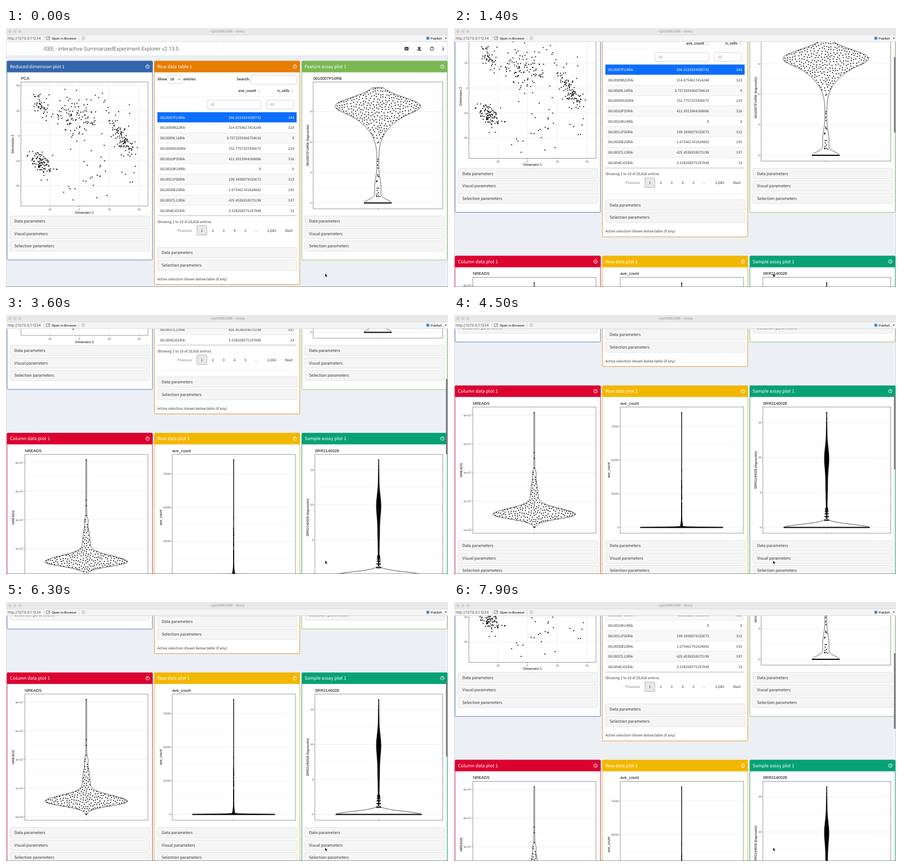
An HTML page for the animation above (8 s loop, 800 px wide and 470 px high).

```html
<!DOCTYPE html>
<html lang="en">
<head>
<meta charset="utf-8">
<title>Shiny app scrolling</title>
<style>
html, body { margin: 0; width: 100%; height: 100%; overflow: hidden; background: #ecf0f5; }
svg { display: block; width: 800px; height: 470px; }
text { white-space: pre; text-rendering: geometricPrecision; }
.ui { font-family: "Noto Sans CJK JP", "Noto Sans CJK SC", "Noto Sans", sans-serif; }
.plot { font-family: "Liberation Sans", Arial, sans-serif; }
.bar { font-family: Inter, "Liberation Sans", sans-serif; }
.logo { font-family: Roboto, "Liberation Sans", sans-serif; font-weight: 300; }
</style>
</head>
<body>
<svg id="stage" viewBox="0 0 800 470"></svg>
<script>
let seed = 11;
const rnd = () => (seed = (seed * 16807) % 2147483647) / 2147483647;
const gauss = () => Math.sqrt(-2 * Math.log(rnd())) * Math.cos(2 * Math.PI * rnd());

const END = 'text-anchor="end"', MID = 'text-anchor="middle"', BOLD = 'font-weight="600"';
const SMALL = 6.4;
const text = (x, y, s, size, cls = 'ui', fill = '#333', extra = '') =>
  `<text x="${x}" y="${y}" dy=".36em" font-size="${size}" class="${cls}" fill="${fill}" ${extra}>${s}</text>`;
const label = (x, y, s, extra = '', fill = '#333') => text(x, y, s, SMALL, 'ui', fill, extra);
const rect = (x, y, w, h, fill, stroke = 'none', extra = '') =>
  `<rect x="${x}" y="${y}" width="${w}" height="${h}" fill="${fill}" stroke="${stroke}" ${extra}/>`;
const path = (d, stroke, width = 1, fill = 'none', extra = '') =>
  `<path d="${d}" stroke="${stroke}" stroke-width="${width}" fill="${fill}" ${extra}/>`;
const dots = (pts, size = 2) =>
  path(pts.map(p => `M${p[0].toFixed(1)} ${p[1].toFixed(1)}h.01`).join(''), '#000', size, 'none', 'stroke-linecap="round"');
const range = (n, f) => Array.from({ length: n }, (_, i) => f(i));

const help = (x, y, color, r = 3.2) =>
  `<circle cx="${x}" cy="${y}" r="${r}" fill="none" stroke="${color}" stroke-width=".9"/>` +
  text(x, y, '?', 5, 'ui', color, MID + ' font-weight="700"');

function panel(x, y, h, color, title) {
  return rect(x, y, 263, h, '#fff', color, 'rx="1.5" stroke-width=".8"') +
    rect(x - .4, y - .3, 263.8, 20.7, color, 'none', 'rx="1.5"') +
    text(x + 5, y + 10, title, 8.2, 'ui', '#fff', 'font-weight="500"') + help(x + 254.3, y + 10, '#fff');
}

const PARAMS = ['Data parameters', 'Visual parameters', 'Selection parameters'];
const foldouts = (x, y, names = PARAMS) => names.map((s, i) =>
  rect(x + 5.5, y - 9.5 + i * 22.5, 252.5, 19, '#f5f5f5', '#ddd', 'rx="2" stroke-width=".8"') +
  text(x + 13, y + i * 22.5, s, 7.3)).join('');

// Plot frame with grid; ticks are evenly spaced from y0 by step.
function frame(x, y, w, h, title, yTitle, ticks, y0, step, titleX, columns) {
  let s = text(x, y - 7, title, 7.3, 'plot', '#000');
  ticks.forEach((tick, i) => {
    const ty = y0 + i * step;
    s += path(`M${x} ${ty}h${w}`, '#ebebeb', .8);
    if (i) s += path(`M${x} ${ty - step / 2}h${w}`, '#f3f3f3', .5);
    s += path(`M${x - 1.8} ${ty}h1.8`, '#555', .6) + text(x - 2.6, ty, tick, 5, 'plot', '#4d4d4d', END);
  });
  for (const cx of columns) s += path(`M${cx} ${y}v${h}`, '#ebebeb', .8) + path(`M${cx} ${y + h}v1.8`, '#555', .6);
  const cy = y + h / 2;
  return s + rect(x, y, w, h, 'none', '#7f7f7f', 'stroke-width=".8"') +
    text(titleX, cy, yTitle, 6.1, 'plot', '#000', `${MID} transform="rotate(-90 ${titleX} ${cy})"`);
}

// Half width of a violin at y: a thin stem plus bumps [centre, height, spread above, spread below].
const profile = (stem, ...bumps) => y => bumps.reduce((w, [c, h, up, down]) =>
  w + h * Math.exp(-(((y - c) / (y < c ? up : down)) ** 2) / 2), stem);

function violin(cx, top, bottom, width, fill = '#fff') {
  const ys = range(2 * (bottom - top) + 1, i => top + i / 2);
  const side = k => ys.map(y => `${(cx + k * width(y)).toFixed(2)} ${y}`);
  return path('M' + [...side(1), ...side(-1).reverse()].join('L') + 'Z', '#222', .8, fill);
}
function swarm(cx, top, bottom, width, max, gap) {
  const pts = [];
  for (let i = 0; i < 8000; i++) {
    const x = cx + (rnd() * 2 - 1) * max, y = top + rnd() * (bottom - top);
    if (Math.abs(x - cx) < width(y) - 1 && pts.every(p => Math.hypot(p[0] - x, p[1] - y) > gap)) pts.push([x, y]);
  }
  return dots(pts);
}
const baseline = (cx, y, w) => path(`M${cx - w} ${y}h${2 * w}`, '#000', 2);

function pcaPlot() {
  // count, centre, spread, slope
  const clusters = [[50, 64, 143, 9, 10, .4], [100, 63, 244, 11, 10, .5], [75, 128, 163, 20, 16, .1],
    [55, 145, 168, 38, 32, 0], [100, 213, 203, 13, 12, 1.1], [26, 142, 275, 44, 22, 0]];
  const pts = clusters.flatMap(([n, cx, cy, sx, sy, slope]) => range(n, () => {
    const dx = gauss() * sx;
    return [cx + dx, cy + dx * slope + gauss() * sy];
  }));
  const xs = range(4, i => 79 + 54 * i);
  return frame(27, 98, 230, 225, 'PCA', 'Dimension 2', ['50', '25', '0', '-25', '-50'], 104.5, 45.4, 12, xs) +
    xs.map((x, i) => text(x, 329, i * 25 - 25, 5, 'plot', '#4d4d4d', MID)).join('') +
    text(142, 334.5, 'Dimension 1', 6.1, 'plot', '#000', MID) +
    dots(pts.filter(p => p[0] > 35 && p[0] < 248 && p[1] > 106 && p[1] < 314));
}

function featurePlot() {
  const cx = 673, width = profile(1.5, [142, 28, 16, 11], [142, 48, 16, 29], [290, 4.3, 16, 20], [317.5, 21, 6, 1]);
  const stem = range(22, () => {
    const y = 308 - 102 * rnd() ** 1.7;
    return [cx + (rnd() - .5) * width(y), y];
  });
  return frame(556, 98, 234.5, 230, '0610007P14Rik', '0610007P14Rik (logcounts)', ['9', '6', '3', '0'], 151.5, 55.3, 546, [cx]) +
    violin(cx, 108.5, 317.5, width) + swarm(cx, 109, 200, width, 78, 3.9) + dots(stem) + baseline(cx, 317.5, 25);
}

function readsPlot() {
  const cx = 145.3, width = profile(.7, [734, 74, 11, 7.8], [698, 6, 22, 12], [659, 1.5, 4, 4]);
  return frame(34, 539, 223, 229, 'NREADS', 'NREADS', ['8e+07', '6e+07', '4e+07', '2e+07', '0e+00'], 553.7, 52, 13, [cx]) +
    violin(cx, 549, 758, width) + swarm(cx, 650, 758, width, 76, 3.5) +
    dots([549, 622, 632, 757].map(y => [cx, y]));
}

function countPlot() {
  const cx = 412, width = profile(.3, [757.5, 73, .7, 1], [757.5, 2, 8, 1]);
  const pts = [[cx, 549], [cx, 654], ...range(75, () => [cx, 757 - 90 * rnd() ** 2])];
  return frame(301, 539, 223, 229, 'ave_count', 'ave_count', ['75000', '50000', '25000', '0'], 574.5, 61, 280, [cx]) +
    violin(cx, 549, 757.5, width, '#000') + dots(pts) + baseline(cx, 757.6, 74.7);
}

function samplePlot() {
  const cx = 674.5, body = profile(.4, [631, 2.6, 18, 16], [660, 1.6, 42, 45]);
  const base = profile(1, [757.5, 76, 5.5, 1]);
  const top = [549, 560.5, ...range(8, i => 566 + 3 * i)].map(y => [cx, y]);
  const counts = range(7, i => baseline(cx, 744.5 - 27 * (1 - .75 ** i), 4.5 - i * .4));
  return frame(559, 539, 231.5, 229, 'SRR2140028', 'SRR2140028 (logcounts)', ['15', '10', '5', '0'], 567, 63.5, 546, [cx]) +
    violin(cx, 742, 757.5, base) + violin(cx, 549, 742, body, '#000') + dots(top) + counts.join('') +
    baseline(cx, 757.6, 78);
}

const GENES = `0610007P14Rik 586.8153034300792 344
0610009B22Rik 314.6754617414248 323
0610009L18Rik 0.7572559366754618 9
0610009O20Rik 152.7757255936675 219
0610010F05Rik 412.9313984168866 316
0610010K14Rik 0 0
0610011F06Rik 199.3430079155673 313
0610030E20Rik 1.675461741424802 191
0610037L13Rik 425.4538258575198 337
0610040J01Rik 5.538258575197889 13`.split('\n').map(line => line.split(' '));

function table() {
  const field = (x, y, w, h) => rect(x, y, w, h, '#fff', '#ccc', 'stroke-width=".8" rx="1"');
  const column = (right, left, name) => label(right - 8, 114, name, `${END} ${BOLD}`) +
    path(`M${right - 4.2} 113.4l1.6 -2.4l1.6 2.4zm0 1.6l1.6 2.4l1.6 -2.4z`, 'none', 0, '#ccc') +
    field(left, 131, right - left, 16) + label(left + 6.5, 139, 'All', '', '#999');
  let s = label(274, 93, 'Show', BOLD) + field(293, 86, 26, 14.5) + label(297, 93, '10', BOLD) +
    path('M311.5 92l2 2l2 -2', '#333', .9) + label(321, 93, 'entries', BOLD) +
    label(441.5, 93, 'Search:', `${END} ${BOLD}`) + field(443.5, 85.5, 82.5, 16.5) +
    path('M274 124.5h252', '#eee', .7) + column(461, 363.5, 'ave_count') + column(521, 471.5, 'n_cells');
  GENES.forEach(([id, mean, n], i) => {
    const y = 162.2 + i * 18.78, ink = i ? '#333' : '#fff';
    s += rect(274, y - 9.4, 252, 18.78, i ? (i % 2 ? '#fff' : '#f8f8f8') : '#0d6efd');
    if (i) s += path(`M274 ${y - 9.4}h252`, '#ddd', .6);
    s += label(279, y, id, '', ink) + label(461.5, y, mean, END, ink) + label(521.5, y, n, END, ink);
  });
  s += path('M274 340.6h252', '#999', .7) + label(274, 351.3, 'Showing 1 to 10 of 20,816 entries') +
    rect(345.5, 358.5, 18, 17.5, '#e8e8e8', '#aaa', 'rx="1" stroke-width=".8"') +
    label(323.5, 367.3, 'Previous', MID, '#777') +
    ['1', '2', '3', '4', '5', '...'].map((n, i) => label(354.5 + 19.75 * i, 367.3, n, MID)).join('') +
    label(481, 367.3, '2,082', MID) + label(512, 367.3, 'Next', MID);
  return s + path('M274 387.5h252', '#eee', .8);
}

function appHeader() {
  return rect(0, 25, 800, 25.5, '#fff') + path('M0 50.5h800', '#d9dfe6', .8) + path('M382.5 25v25', '#eee', .8) +
    text(68, 38, 'iSEE - interactive SummarizedExperiment Explorer v2.13.5', 9.7, 'logo') +
    rect(721.5, 34.5, 7, 6, '#222', 'none', 'rx=".8"') + path('M722.8 36.2l4.4 2.8m0 -2.8l-4.4 2.8', '#fff', .8) +
    path('M748 33.5v3M746 36.2l2 2l2 -2z', '#222', 1.2, '#222') + path('M744.5 40h7', '#222', 1.7) +
    help(771, 37.5, '#222') + text(791.3, 37.5, 'i', 8.5, 'ui', '#222', MID + ' font-weight="700"');
}

function windowBar() {
  const button = (x, s) => text(x, 18.6, s, 5.65, 'bar', '#222', 'font-weight="500"');
  return rect(0, 0, 800, 13, '#e9e7e8') + rect(0, 13, 800, 12, '#f6f5f5') + path('M0 12.8h800', '#dad9d9', .5) +
    path('M0 24.7h800', '#cfcfcf', .7) +
    [7, 16, 25].map(x => `<circle cx="${x}" cy="6.3" r="2.7" fill="#d1cfd0"/>`).join('') +
    text(400, 6.3, '~/git/iSEE/iSEE - Shiny', 5.8, 'bar', '#a5a3a4', `${MID} ${BOLD}`) +
    text(3, 18.6, 'http://127.0.0.1:1234', 6.5, 'bar', '#555') + path('M69 15v7M132 15v7', '#ccc', .7) +
    rect(73, 16, 6, 5, '#fff', '#667', 'stroke-width=".8"') + path('M75.5 19.5l3.5 -3.5', '#3b78b5') +
    button(83, 'Open in Browser') + rect(137, 15.5, 6, 6, '#ddd', '#c4c4c4', 'stroke-width=".7" rx="2"') +
    '<circle cx="763.5" cy="18.5" r="3" fill="#4a90d0"/>' +
    button(769, 'Publish') + path('M794 17.5h4l-2 2.5z', 'none', 0, '#555');
}

const LEFT = [2, 268.7, 535.5];
const [A, B, C] = LEFT;
const page = appHeader() +
  panel(A, 60, 361, '#3565aa', 'Reduced dimension plot 1') + pcaPlot() + foldouts(A, 350.5) +
  panel(B, 60, 405.5, '#e47e04', 'Row data table 1') + table() + foldouts(B, 407.7, [PARAMS[0], PARAMS[2]]) +
  label(274, 455.3, 'Active selection shown below table (if any).') +
  panel(C, 60, 361, '#7bb854', 'Feature assay plot 1') + featurePlot() + foldouts(C, 350.5) +
  panel(A, 500.3, 362, '#db0230', 'Column data plot 1') + readsPlot() +
  panel(B, 500.3, 362, '#f2b701', 'Row data plot 1') + countPlot() +
  panel(C, 500.3, 362, '#07a274', 'Sample assay plot 1') + samplePlot() +
  LEFT.map(x => foldouts(x, 790.7)).join('');

document.getElementById('stage').innerHTML = rect(0, 0, 800, 470, '#ecf0f5') + `<g id="page">${page}</g>` +
  rect(796.3, 0, 3, 137.5, '#777', 'none', 'id="thumb" rx="1.5"') + windowBar() +
  path('M.3 25V470M799.7 25V470', '#b9c4d2', .6) + path('M0 469.6h800', '#777', .8) +
  path('M577.5 445.5v6.3l1.5 -1.3l1 2.3l1.1 -.5l-1 -2.2h2z', '#fff', .5, '#000');

const pageNode = document.getElementById('page'), thumb = document.getElementById('thumb');
// Scroll position at key times: [ms, px]
const KEYS = [[300, 0], [1100, 74], [1200, 74], [2000, 124], [3600, 286], [4500, 372], [5100, 407],
  [6000, 407], [6300, 372], [8000, 203.5]];

function scrollAt(t) {
  if (t <= KEYS[0][0]) return 0;
  const i = KEYS.findIndex(k => k[0] >= t), [t0, a] = KEYS[i - 1], [t1, b] = KEYS[i];
  return a + (b - a) * (t - t0) / (t1 - t0);
}

function draw() {
  const t = Math.floor(performance.now() % 8000 / 100) * 100;
  const y = scrollAt(t);
  pageNode.setAttribute('transform', `translate(0 ${-y})`);
  thumb.setAttribute('y', 25 + y * .317);
  thumb.setAttribute('opacity', t < 400 || (t >= 5500 && t < 6100) ? 0 : t === 5400 ? .5 : 1);
  requestAnimationFrame(draw);
}
draw();
</script>
</body>
</html>
```
